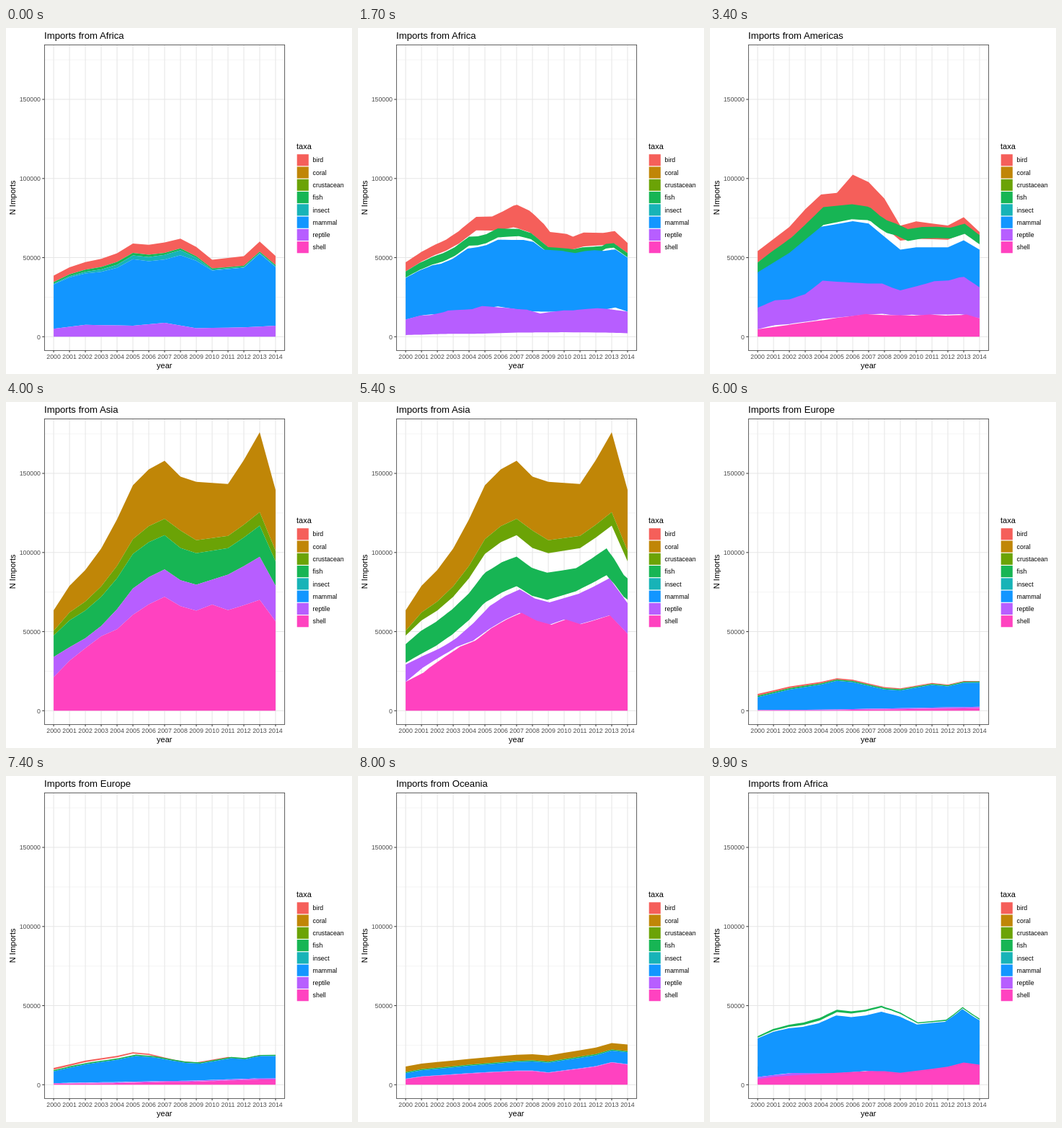
Write an HTML page that moves like this. It is 480 px wide and 480 px high and loops after 10 s.

```html
<!DOCTYPE html>
<html lang="en">
<head>
<meta charset="utf-8">
<title>Imports by taxa</title>
<style>
  html, body { margin: 0; width: 100%; height: 100%; overflow: hidden; background: #fff; }
  svg { display: block; width: 100vw; height: 100vh; }
  text { font-family: "Liberation Sans", Arial, Helvetica, sans-serif; font-size: 8.8px; }
  .tick { fill: #4d4d4d; }
  .title { font-size: 11px; }
  .head { font-size: 13.2px; }
</style>
</head>
<body>
<svg id="stage" viewBox="0 0 480 480"></svg>
<script>
const svg = document.getElementById('stage');
const colors = {
  bird: '#f55f5a', coral: '#c08607', crustacean: '#6ba306', fish: '#17b554',
  insect: '#17b3b7', mammal: '#1296ff', reptile: '#b75eff', shell: '#ff42c0'
};
const taxa = Object.keys(colors);
const YEARS = 15, POINTS = 50, STEP = 100;
const HOLD = 2000, LOOP = 5 * HOLD;
const box = { left: 53, top: 23, right: 386.6, bottom: 447.4 };
const px = year => 66.1 + year * 21.99;
const py = thousands => 428.3 - thousands * 2.195;

// Straight lines through a few (year, value) pairs
function curve(...keys) {
  return x => {
    let i = 0;
    while (i < keys.length - 4 && x > keys[i + 2]) i += 2;
    const [x0, y0, x1, y1] = keys.slice(i, i + 4);
    return y0 + (y1 - y0) * (x - x0) / (x1 - x0);
  };
}
const ramp = (from, to) => curve(0, from, YEARS - 1, to);
const on = thickness => (x, below) => below + thickness(x);
const share = (total, part) => x => total(x) * part(x);

const asia = curve(0, 63.5, 1, 79, 2, 89, 3, 102.5, 4, 121, 5, 142.5, 6, 152.5, 7, 158,
  8, 148, 9, 144.7, 11, 143.3, 12, 158.5, 13, 176, 14, 139.5);

// Upper edges in thousands, lowest layer first
const states = [
  stack('Africa', {
    reptile: curve(0, 5, 2, 7.5, 5, 7, 7, 8.8, 9, 5.4, 12, 5.9, 14, 7),
    mammal: curve(0, 33, 1, 37.5, 2, 40, 3, 41, 4, 43.5, 5, 49, 6, 47.7, 7, 48.8,
      8, 51.5, 9, 48, 10, 41.8, 12, 43.6, 13, 52.5, 14, 44),
    insect: on(curve(0, 0.5, 2, 1, 5, 2.4, 8, 3.2, 10, 0.6, 14, 0.5)),
    fish: on(curve(0, 1, 4, 1.8, 10, 0.75, 14, 0.8)),
    bird: on(curve(0, 4.1, 7, 6.6, 10, 5.5, 13, 6.3, 14, 5.7))
  }),
  stack('Americas', {
    shell: curve(0, 2, 7, 4.8, 11, 5.2, 13, 4.9, 14, 4.1),
    reptile: curve(0, 15.7, 1, 19.6, 2, 19.9, 3, 22.5, 4, 29.2, 7, 24.8, 8, 24.3,
      9, 20.9, 11, 25.7, 12, 25.9, 13, 28.3, 14, 23.3),
    mammal: curve(0, 40.7, 2, 53, 4, 69.5, 6, 73, 7, 71.5, 9, 55, 10, 56.5,
      12, 56.5, 13, 61, 14, 55),
    fish: on(curve(0, 6.2, 2, 8.4, 4, 9.6, 7, 6.3, 14, 4.2)),
    bird: on(curve(0, 7.2, 2, 8, 3, 10.3, 5, 11.2, 6, 22, 8, 18, 9, 9.5, 10, 11,
      12, 9, 13, 10, 14, 7))
  }),
  stack('Asia', {
    shell: share(asia, curve(0, 0.334, 1, 0.4, 2, 0.444, 3, 0.459, 4, 0.426, 5, 0.425,
      7, 0.456, 9, 0.437, 10, 0.466, 13, 0.398, 14, 0.405)),
    reptile: share(asia, curve(0, 0.535, 1, 0.508, 4, 0.53, 7, 0.565, 9, 0.55,
      11, 0.6, 13, 0.553, 14, 0.566)),
    fish: share(asia, curve(0, 0.748, 1, 0.722, 4, 0.692, 7, 0.702, 9, 0.688,
      11, 0.717, 13, 0.665, 14, 0.677)),
    crustacean: share(asia, curve(0, 0.795, 4, 0.757, 6, 0.765, 8, 0.77, 9, 0.745,
      11, 0.771, 13, 0.713, 14, 0.724)),
    coral: asia
  }),
  stack('Europe', {
    shell: curve(0, 0.2, 4, 0.25, 14, 1.7),
    reptile: on(ramp(0.3, 0.8)),
    mammal: curve(0, 8.6, 2, 13.4, 4, 16.5, 5, 18.9, 6, 18, 8, 13.5, 9, 12.8,
      11, 16.3, 12, 15.4, 13, 17.7, 14, 17.8),
    fish: on(ramp(0.9, 0.7)),
    bird: on(ramp(1.1, 0.3))
  }),
  stack('Oceania', {
    shell: curve(0, 3.5, 1, 5, 4, 7, 7, 8.6, 8, 8.6, 9, 7.5, 11, 10.1, 12, 11.4,
      13, 14, 14, 12.7),
    reptile: on(ramp(0.3, 0.3)),
    mammal: on(ramp(3.5, 7.5)),
    fish: on(ramp(0.7, 0.7)),
    coral: on(ramp(3.5, 4.2))
  })
];

function stack(name, rules) {
  const layers = {};
  let below = Array(YEARS).fill(0);
  for (const [taxon, rule] of Object.entries(rules)) {
    const edge = below.map((lo, x) => ({ x, lo, hi: rule(x, lo) }));
    layers[taxon] = { edge, dense: split(edge) };
    below = edge.map(p => p.hi);
  }
  return { name, layers };
}

function mix(a, b, t) {
  const lerp = key => a[key] + (b[key] - a[key]) * t;
  return { x: lerp('x'), lo: lerp('lo'), hi: lerp('hi') };
}

// Cuts the longest pieces of the upper edge until there are enough points
function split(edge) {
  const parts = edge.slice(1).map((p, i) => ({ len: Math.abs(p.hi - edge[i].hi), cuts: 1 }));
  const size = part => part.len / part.cuts;
  for (let n = edge.length; n < POINTS; n++) {
    parts.reduce((a, b) => size(b) > size(a) ? b : a).cuts++;
  }
  const out = parts.flatMap(({ cuts }, i) =>
    Array.from({ length: cuts }, (_, k) => mix(edge[i], edge[i + 1], k / cuts)));
  return [...out, edge[edge.length - 1]];
}

function add(tag, attrs, label) {
  const el = document.createElementNS('http://www.w3.org/2000/svg', tag);
  for (const key in attrs) el.setAttribute(key, attrs[key]);
  if (label !== undefined) el.textContent = label;
  return svg.appendChild(el);
}

function line(x1, y1, x2, y2, stroke, width) {
  add('line', { x1, y1, x2, y2, stroke, 'stroke-width': width });
}

function write(label, x, y, attrs) {
  return add('text', { x, y, ...attrs }, label);
}

for (let v = 25; v < 180; v += 50) line(box.left, py(v), box.right, py(v), '#ebebeb', 0.55);
for (let v = 0; v < 180; v += 50) line(box.left, py(v), box.right, py(v), '#e6e6e6', 1.07);
for (let i = 0; i < YEARS; i++) line(px(i), box.top, px(i), box.bottom, '#e6e6e6', 1.07);

const areas = {};
for (const taxon of taxa) areas[taxon] = add('polygon', { fill: colors[taxon] });

add('rect', {
  x: box.left + 0.4, y: box.top + 0.4, width: box.right - box.left - 0.4,
  height: box.bottom - box.top - 0.4, fill: 'none', stroke: '#4d4d4d', 'stroke-width': 0.9
});
for (let v = 0; v < 180; v += 50) {
  line(box.left - 2.75, py(v), box.left, py(v), '#333', 1);
  write(v * 1000, 48, py(v) + 3.2, { class: 'tick', 'text-anchor': 'end' });
}
for (let i = 0; i < YEARS; i++) {
  line(px(i), box.bottom, px(i), box.bottom + 2.75, '#333', 1);
  write(2000 + i, px(i), 459, { class: 'tick', 'text-anchor': 'middle' });
}
write('year', 219.8, 472, { class: 'title', 'text-anchor': 'middle' });
write('N Imports', 0, 0, {
  class: 'title', 'text-anchor': 'middle', transform: 'translate(13.3 235.3) rotate(-90)'
});
const heading = write('', 53, 15, { class: 'head' });

write('taxa', 403, 167.6, { class: 'title' });
taxa.forEach((taxon, i) => {
  const y = 174.6 + i * 17.28;
  add('rect', { x: 403.7, y: y + 0.6, width: 16.1, height: 16.1, fill: colors[taxon] });
  write(taxon, 425.6, y + 11.8);
});

function outline(edge) {
  const top = edge.map(p => [px(p.x), py(p.hi)]);
  const base = edge.map(p => [px(p.x), py(p.lo)]).reverse();
  return top.concat(base).map(p => p[0].toFixed(2) + ',' + p[1].toFixed(2)).join(' ');
}

// The first move is slower and ends later than the others
function draw(time) {
  const i = Math.floor(Math.max(0, time - 200) / HOLD);
  const first = time < 2200;
  const at = first ? 0 : i;
  const steps = first ? 11 : 7;
  const end = first ? 2200 : (at + 1) * HOLD;
  const from = states[at], to = states[(at + 1) % states.length];
  const done = Math.max(0, steps - (end - time) / STEP);
  const t = Math.min(1, done / steps);
  heading.textContent = 'Imports from ' + (done > Math.ceil(steps / 2) ? to : from).name;
  for (const taxon of taxa) {
    const a = from.layers[taxon], b = to.layers[taxon];
    // Layers without a partner wait in place until the move ends
    let edge = (t < 1 ? a : b)?.edge ?? [];
    if (a && b && t > 0 && t < 1) edge = a.dense.map((p, k) => mix(p, b.dense[k], t));
    areas[taxon].setAttribute('points', outline(edge));
  }
}

const began = performance.now();
let shown = -1;
function tick() {
  const time = Math.floor(((performance.now() - began) % LOOP) / STEP) * STEP;
  if (time !== shown) draw(shown = time);
  requestAnimationFrame(tick);
}
tick();
</script>
</body>
</html>
```
